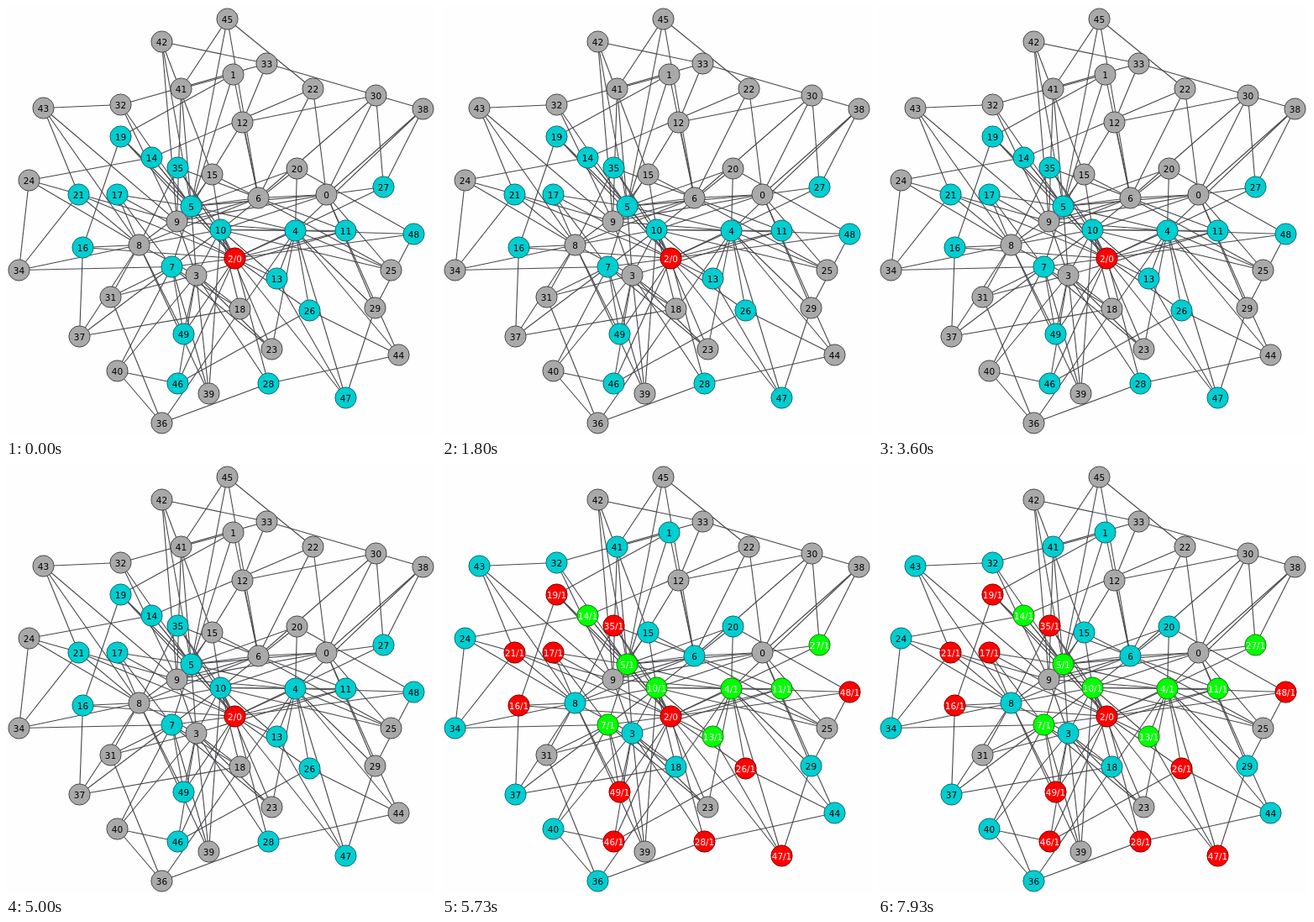
Animation, 512 px wide and 512 px high, one loop 8000 ms. Source, as an HTML page:

```html
<!DOCTYPE html>
<html lang="en">
<head>
<meta charset="utf-8">
<title>Spread through a network</title>
<style>
  html, body { margin: 0; width: 100%; height: 100%; overflow: hidden; background: #fefefe; }
  svg { display: block; width: 100vw; height: 100vh; }
  line { stroke: #48484c; stroke-width: 1.1; }
  circle { stroke: #484848; stroke-width: 1; }
  text { font: 10.5px "DejaVu Sans", Verdana, sans-serif; text-anchor: middle; fill: #000; }
  .idle circle { fill: #a9a9a9; }
  .exposed circle { fill: #00ced1; stroke: #14686a; }
  .infected circle { fill: #f00; stroke: #700; }
  .immune circle { fill: #0f0; stroke: #187a10; }
  .infected text, .immune text { fill: #fff; }
</style>
</head>
<body>
<svg viewBox="-0.5 -0.5 512 512"><g id="links"></g><g id="nodes"></g></svg>
<script>
const LOOP = 8000, SPREAD_AT = 5070;
const SOURCE = 2, LAST_HUB = 10, MIN_LINKS = 4, MIN_REACH = 60;

const points = [
  [381, 224], [270, 81], [272, 300], [226, 320], [344, 267],
  [220, 238], [300, 228], [197, 310], [158, 284], [203, 256],
  [255, 266], [404, 267], [281, 138], [322, 324], [173, 180],
  [245, 200], [91, 287], [132, 224], [278, 360], [136, 155],
  [346, 193], [86, 224], [365, 98], [316, 408], [27, 207],
  [458, 314], [361, 362], [449, 215], [312, 449], [439, 359],
  [440, 106], [124, 346], [136, 117], [310, 68], [15, 314],
  [204, 192], [185, 496], [87, 393], [496, 122], [241, 461],
  [132, 434], [208, 98], [185, 42], [44, 121], [467, 415],
  [263, 15], [204, 449], [404, 466], [485, 271], [211, 390]
];

const infected = [16, 17, 19, 21, 26, 28, 35, 46, 47, 48, 49];
const immune = [4, 5, 7, 10, 11, 13, 14, 27];
const bystanders = [0, 9, 12, 22, 23, 25, 30, 31, 33, 38, 39, 42, 45];
const reached = [...infected, ...immune];

// chains of links around the rim
const trails = [
  [7, 34, 24, 14, 22, 45, 41, 1, 19, 16, 37, 18],
  [34, 21, 43, 32, 33, 42, 15],
  [31, 36, 40, 46, 26, 44, 28, 36, 4],
  [13, 47, 29, 48, 20],
  [33, 38, 27, 30, 12, 33]
];

const links = points.map(() => new Set());
const linkLayer = document.getElementById("links");
const nodeLayer = document.getElementById("nodes");

function add(parent, tag, attrs) {
  const el = document.createElementNS("http://www.w3.org/2000/svg", tag);
  for (const key in attrs) el.setAttribute(key, attrs[key]);
  return parent.appendChild(el);
}

function join(a, b) {
  links[a].add(b);
  links[b].add(a);
  const [x1, y1] = points[a], [x2, y2] = points[b];
  add(linkLayer, "line", { x1, y1, x2, y2 });
}

function distance(a, b) {
  return Math.hypot(points[a][0] - points[b][0], points[a][1] - points[b][1]);
}

// infected nodes never touch bystanders
function mayJoin(a, b) {
  const clash = (p, q) => infected.includes(p) && bystanders.includes(q);
  return !links[a].has(b) && distance(a, b) > MIN_REACH && !clash(a, b) && !clash(b, a);
}

// nodes short of links join the nearest hubs
function joinHubs(id) {
  const hubs = points.map((_, hub) => hub)
    .filter(hub => hub <= LAST_HUB && hub !== 1 && hub !== SOURCE && mayJoin(id, hub))
    .sort((a, b) => distance(id, a) - distance(id, b));
  const missing = Math.max(0, MIN_LINKS - links[id].size);
  hubs.slice(0, missing).forEach(hub => join(id, hub));
}

for (const trail of trails) trail.slice(1).forEach((id, i) => join(trail[i], id));
for (const id of reached) join(SOURCE, id);
points.forEach((_, id) => joinHubs(id));

const nodes = points.map(([x, y]) => {
  const group = add(nodeLayer, "g", {});
  add(group, "circle", { cx: x, cy: y, r: 12.6 });
  return { group, label: add(group, "text", { x, y: y + 4.3 }) };
});

function status(id, spread) {
  if (id === SOURCE) return "infected";
  if (!spread) return reached.includes(id) ? "exposed" : "idle";
  if (infected.includes(id)) return "infected";
  if (immune.includes(id)) return "immune";
  return bystanders.includes(id) ? "idle" : "exposed";
}

function show(spread) {
  nodes.forEach(({ group, label }, id) => {
    group.setAttribute("class", status(id, spread));
    const suffix = id === SOURCE ? "/0" : spread && reached.includes(id) ? "/1" : "";
    label.textContent = id + suffix;
  });
}

let shown;
function tick() {
  const spread = performance.now() % LOOP >= SPREAD_AT;
  if (spread !== shown) show(shown = spread);
  requestAnimationFrame(tick);
}
tick();
</script>
</body>
</html>
```
